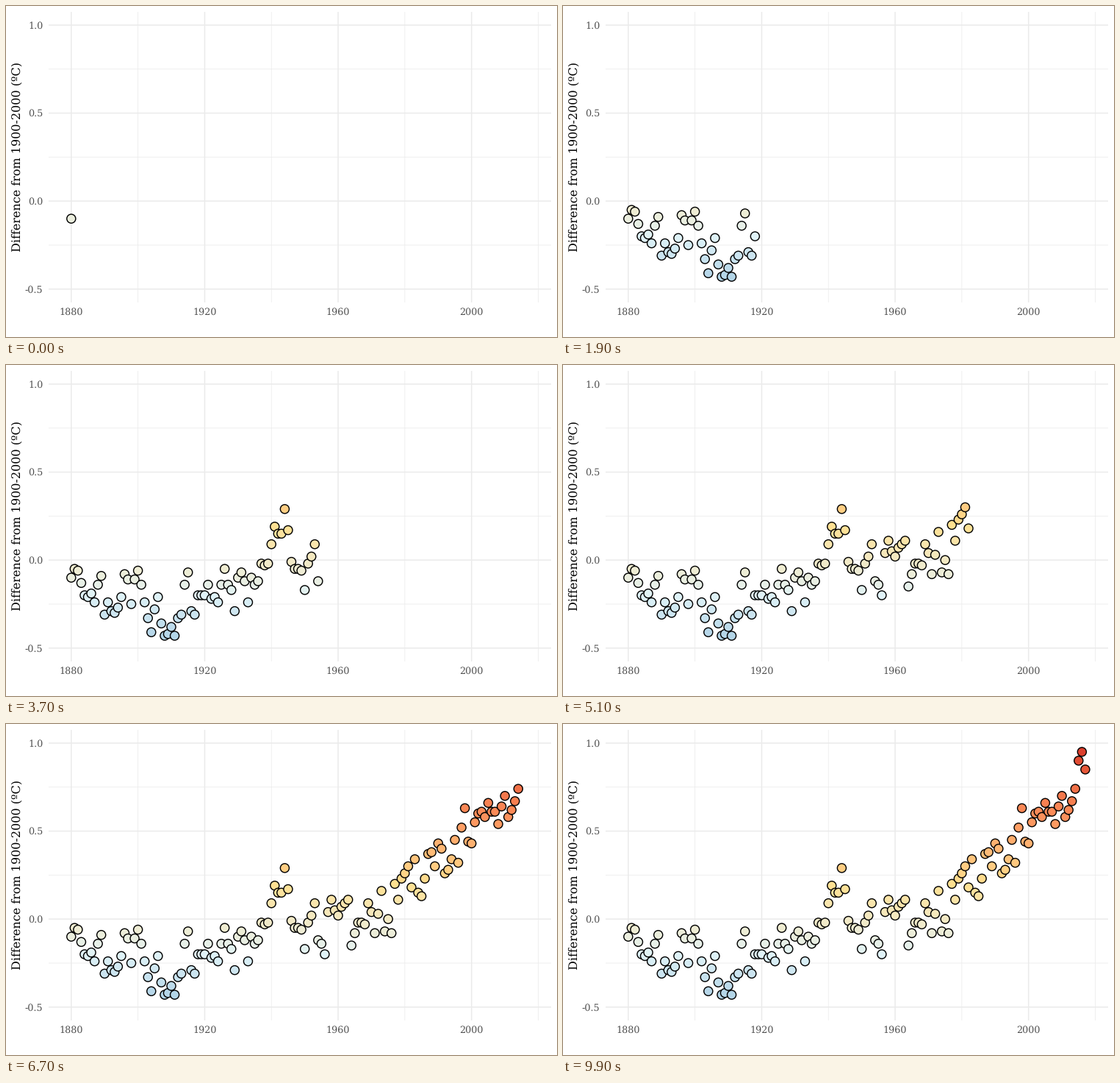
Animation, 750 px wide and 450 px high, one loop 10 s. Source, as a matplotlib script:

```python
import matplotlib.pyplot as plt
import numpy as np
from matplotlib.animation import FuncAnimation

W, H, DPI = 750, 450, 100
PT = 72 / DPI  # points per pixel
FRAMES, INTERVAL = 100, 100
YEARS_PER_FRAME = 2

plt.rcParams.update({
    "font.family": "DejaVu Serif",
    "text.hinting": "none",
    "path.snap": False,
})

# Panel edges in pixels, y measured from the top
LEFT, RIGHT, TOP, BOTTOM = 57.7, 742, 8, 402.8
X_LIM = (1880 - 6.85, 2017 + 6.85)
Y_LIM = (-0.575, 1.075)

# Yearly anomaly in hundredths of a degree, starting in 1880
ANOMALY = np.array([
    -10, -5, -6, -13, -20, -21, -19, -24, -14, -9,
    -31, -24, -29, -30, -27, -21, -8, -11, -25, -11,
    -6, -14, -24, -33, -41, -28, -21, -36, -43, -42,
    -38, -43, -33, -31, -14, -7, -29, -31, -20, -20,
    -20, -14, -22, -21, -24, -14, -5, -14, -17, -29,
    -10, -7, -12, -24, -10, -14, -12, -2, -3, -2,
    9, 19, 15, 15, 29, 17, -1, -5, -5, -6,
    -17, -2, 2, 9, -12, -14, -20, 4, 11, 5,
    2, 7, 9, 11, -15, -8, -2, -2, -3, 9,
    4, -8, 3, 16, -7, 0, -8, 20, 11, 23,
    26, 30, 18, 34, 15, 13, 23, 37, 38, 30,
    43, 40, 26, 28, 34, 45, 32, 52, 63, 44,
    43, 55, 60, 61, 58, 66, 61, 61, 54, 64,
    70, 58, 62, 67, 74, 90, 95, 85,
]) / 100
YEARS = 1880 + np.arange(len(ANOMALY))

PALETTE = ["#4575B4", "#91BFDB", "#E0F3F8", "#FEE090", "#FC8D59", "#D73027"]
RGB_TO_XYZ = np.array([[0.4124, 0.3576, 0.1805],
                       [0.2126, 0.7152, 0.0722],
                       [0.0193, 0.1192, 0.9505]])
WHITE = RGB_TO_XYZ.sum(axis=1)


def to_lab(rgb):
    lin = np.where(rgb > 0.04045, ((rgb + 0.055) / 1.055) ** 2.4, rgb / 12.92)
    t = lin @ RGB_TO_XYZ.T / WHITE
    f = np.where(t > 0.008856, np.cbrt(t), 7.787 * t + 16 / 116)
    x, y, z = f.T
    return np.column_stack([116 * y - 16, 500 * (x - y), 200 * (y - z)])


def to_rgb(lab):
    fy = (lab[:, 0] + 16) / 116
    f = np.column_stack([fy + lab[:, 1] / 500, fy, fy - lab[:, 2] / 200])
    t = np.where(f > 0.2069, f ** 3, (f - 16 / 116) / 7.787)
    lin = np.clip((t * WHITE) @ np.linalg.inv(RGB_TO_XYZ).T, 0, 1)
    rgb = np.where(lin > 0.0031308, 1.055 * lin ** (1 / 2.4) - 0.055, 12.92 * lin)
    return np.clip(rgb, 0, 1)


def fill_colors(values):
    """Diverging blue-to-red scale over -1..1, blended in Lab space."""
    lab = to_lab(np.array([plt.matplotlib.colors.to_rgb(c) for c in PALETTE]))
    stops = np.linspace(-1, 1, len(PALETTE))
    return to_rgb(np.column_stack([np.interp(values, stops, ch) for ch in lab.T]))


def x_px(year):
    return np.interp(year, X_LIM, (LEFT, RIGHT))


def y_px(value):
    return np.interp(value, Y_LIM, (BOTTOM, TOP))


fig = plt.figure(figsize=(W / DPI, H / DPI), dpi=DPI, facecolor="white")
ax = fig.add_axes([LEFT / W, 1 - BOTTOM / H, (RIGHT - LEFT) / W, (BOTTOM - TOP) / H])
ax.set(xlim=X_LIM, ylim=Y_LIM)
ax.axis("off")


def label(x, y, text, size=12.8, color="#4D4D4D", **kw):
    fig.text(x / W, 1 - y / H, text, fontsize=size * PT, color=color,
             va="baseline", **kw)


def grid(xs, ys, width):
    style = dict(color="#EBEBEB", lw=width * PT, zorder=width)
    for x in xs:
        ax.axvline(x, **style)
    for y in ys:
        ax.axhline(y, **style)


x_ticks = [1880, 1920, 1960, 2000]
y_ticks = [-0.5, 0, 0.5, 1]
grid([1900, 1940, 1980, 2020], [-0.25, 0.25, 0.75], 0.78)
grid(x_ticks, y_ticks, 1.55)
for x in x_ticks:
    label(x_px(x), 420, str(x), ha="center")
for y in y_ticks:
    label(LEFT - 7.2, y_px(y) + 4.67, f"{y:.1f}", ha="right")
label(20, (TOP + BOTTOM) / 2, "Difference from 1900-2000 (ºC)", size=16,
      color="black", ha="center", rotation=90, rotation_mode="anchor")

RADIUS, STROKE = 6.04, 1.42
fills = np.column_stack([fill_colors(ANOMALY), np.ones(len(YEARS))])
edges = np.tile([0.0, 0.0, 0.0, 1.0], (len(YEARS), 1))
dots = ax.scatter(YEARS, ANOMALY, s=(2 * RADIUS * PT) ** 2, c=fills,
                  edgecolors=edges, linewidths=STROKE * PT, zorder=5,
                  clip_on=False)


def draw(frame):
    shown = YEARS <= 1880 + YEARS_PER_FRAME * frame
    fills[:, 3] = edges[:, 3] = shown
    dots.set_facecolor(fills)
    dots.set_edgecolor(edges)
    return [dots]


anim = FuncAnimation(fig, draw, frames=FRAMES, interval=INTERVAL,
                     repeat=True, repeat_delay=0, blit=False)
plt.show()
```
